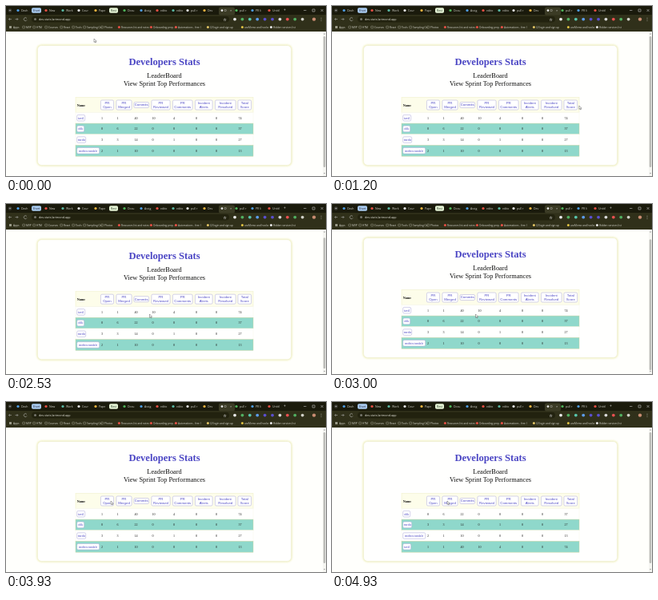
Recreate the animation shown at these times as an HTML page. Size 400 by 213 pixels, loop 5 s.

```html
<!DOCTYPE html>
<html lang="en">
<head>
<meta charset="utf-8">
<title>Developers Stats</title>
<style>
html, body { margin: 0; width: 100%; height: 100%; overflow: hidden; background: #fff; }
svg { display: block; width: 400px; height: 213px; }
text { white-space: pre; }
.serif { font-family: "Liberation Serif", "Times New Roman", serif; }
.sans { font-family: "Liberation Sans", Arial, sans-serif; }
.ui { font-family: "Open Sans", Inter, sans-serif; }
</style>
</head>
<body>
<svg viewBox="0 0 400 213">
  <defs><filter id="soft"><feGaussianBlur stdDeviation="1.2"/></filter></defs>
  <rect width="400" height="213" fill="#fffffc"/>
  <g id="page"></g>
  <rect x="396" y="31" width="4" height="182" fill="#f6f6f2"/>
  <path d="M396.9 35.5l1.1-1.6 1.1 1.6zM396.9 209l1.1 1.6 1.1-1.6z" fill="#999"/>
  <rect id="thumb" x="396.7" y="38" width="2.6" height="164" rx="1.3" fill="#bcbcb8"/>
  <g id="chrome"></g>
  <path id="cursor" d="M0 0V4.4L1.1 3.5 1.8 5 2.5 4.7 1.8 3.2H3.2Z" fill="#fff" stroke="#333" stroke-width=".4"/>
</svg>
<script>
const $ = id => document.getElementById(id);
const rect = (x, y, w, h, fill, more = '') =>
  `<rect x="${x}" y="${y}" width="${w}" height="${h}" fill="${fill}" ${more}/>`;
const text = (x, y, size, fill, str, kind = 'serif', more = '') =>
  `<text x="${x}" y="${y}" font-size="${size}" fill="${fill}" class="${kind}" ${more}>${str}</text>`;
const dot = (x, y, r, fill) => `<circle cx="${x}" cy="${y}" r="${r}" fill="${fill}"/>`;
const line = (d, color, width = .6) =>
  `<path d="${d}" fill="none" stroke="${color}" stroke-width="${width}"/>`;
const mid = 'text-anchor="middle"', bold = 'font-weight="700"';
const indigo = '#4b46c4', edge = 'stroke="#aaa7d8" stroke-width=".5"';

function button(x, y, w, h, lines, size, kind) {
  const first = y + h / 2 + size * .34 - (lines.length - 1) * 2.5;
  return rect(x, y, w, h, '#fff', `rx="1.6" ${edge}`) +
    lines.map((s, i) => text(x + w / 2, first + i * 5, size, indigo, s, kind, mid)).join('');
}

// Browser window
const tabs = [[19, 'Dash'], [54, 'New'], [75, 'Work'], [95, 'Cour'], [116, 'Pape'], [152, 'Docu'],
  [173, 'Assig'], [193, 'edito'], [213, 'edito'], [231, 'pull r'], [252, 'Dev'], [292, 'pull r'],
  [312, 'PR li'], [333, 'Untitl']];
const tabColors = ['#4f9fe8', '#e85045', '#5ab9a5', '#e8e8e8', '#f0b440', '#4fb45b'];
const folders = [[25, 'MVP'], [38, 'HTM'], [53, 'Courses'], [72, 'React'], [87, 'Tools'],
  [101, 'Sampling Co'], [123, 'Photos']];
const links = [[144, 'Resources list and notes', '#e85045'], [184, 'Onboarding prep - fr', '#e85045'],
  [215, 'Automations - free l', '#e85045'], [255, '(2) login and sign up', '#e2c565'],
  [298, 'useMemo and hooks', '#e2c545'], [334, 'Hidden services list', '#e8e8e8']];
const badges = ['#e8e8e8', '#51af61', '#58c5ad', '#5c9df0', '#5a4fd0', '#5a4fd0', '#d8d8d8', '#e95050', '#51af61', '#d0d0c8'];

function drawChrome() {
  let s = rect(0, 0, 400, 32, '#30301a') + rect(0, 0, 400, 11, '#1a1a0c');
  s += rect(266, 1.5, 20, 10, '#3b3b25', 'rx="2"') + dot(270, 5.6, 1.4, '#e6e6e6');
  s += text(273, 7, 3.6, '#eee', 'D', 'ui') + text(280, 7, 4, '#ddd', '×', 'ui');
  s += dot(5, 5.5, 2.2, '#41413a') + line('M4 5L5 6 6 5', '#ddd', .5);
  tabs.forEach(([x, name], i) => {
    s += dot(x - 4, 5.5, 1.6, tabColors[i % tabColors.length]) + text(x, 6.8, 3.5, '#d5d5cd', name, 'ui');
  });
  s += rect(32, 2.3, 12, 6.4, '#a9cbf0', 'rx="1.8"') + text(38, 6.8, 3.5, '#223', 'Short', 'ui', mid);
  s += rect(129, 2.3, 11, 6.4, '#e4f2d4', 'rx="1.8"') + text(134.5, 6.8, 3.5, '#232', 'Rest', 'ui', mid);
  s += text(347, 7.4, 5, '#ddd', '+', 'ui');
  s += line('M372 5.5h3.4M383 4h3v3h-3zM393.5 4l3 3m0-3l-3 3', '#ddd', .5);

  s += line('M7 16.5H3.5l1.5-1.5M3.5 16.5L5 18M11.5 16.5H15l-1.5-1.5M15 16.5L13.5 18', '#bbb', .5);
  s += line('M26 15.6a2 2 0 1 0 .1 1.8', '#ccc', .5);
  s += rect(32, 12.8, 247, 7.6, '#22220f', 'rx="3.8"') + dot(36.5, 16.6, 1.5, '#77776d');
  s += text(41, 18, 3.7, '#e8e8df', 'dev-stats.larimond.app', 'ui');
  s += text(271, 18.5, 5, '#ccc', '☆', 'ui');
  badges.forEach((c, i) => s += dot(286 + i * 9.4, 16.6, 1.9, c));
  s += dot(385, 16.6, 2.2, '#c98c72');
  [15, 16.6, 18.2].forEach(y => s += dot(394, y, .45, '#ddd'));

  s += rect(4, 25, 3, 3, '#999988') + text(9, 27.8, 3.2, '#d5d5cd', 'Apps', 'ui');
  folders.forEach(([x, name]) => {
    s += rect(x - 4.3, 25.2, 3, 2.6, 'none', 'rx=".5" stroke="#c8c8b8" stroke-width=".4"');
    s += text(x, 27.8, 3.2, '#d5d5cd', name, 'ui');
  });
  links.forEach(([x, name, color]) => {
    s += dot(x - 2.6, 26.6, 1.5, color) + text(x, 27.8, 3.1, '#d5d5cd', name, 'ui');
  });
  $('chrome').innerHTML = s;
}

// Leaderboard
const heads = [[118, 17, 'PR Open'], [137.5, 20, 'PR Merged'], [159.5, 19.5, 'Commits'],
  [181.5, 24, 'PR Reviewed'], [208, 25.5, 'PR Comments'], [236, 22.5, 'Incident Alerts'],
  [261, 26.5, 'Incident Resolved'], [289.5, 17.5, 'Total Score']];
const people = [
  { name: 'tavil', w: 10, stats: [1, 1, 40, 10, 4, 0, 0, 74] },
  { name: 'olik', w: 9, stats: [0, 6, 22, 0, 0, 0, 0, 37] },
  { name: 'medu', w: 11, stats: [3, 3, 14, 0, 1, 0, 0, 27] },
  { name: 'mohin.tandale', w: 28, stats: [2, 1, 10, 0, 0, 0, 0, 13] }
];
const byMerged = [1, 2, 3, 0].map(i => people[i]);

function drawPage(rows) {
  let s = rect(38.5, 48.5, 319, 152, '#eeeeb5', 'rx="6" filter="url(#soft)"');
  s += rect(39.5, 49.5, 317, 150, '#fffffe', 'rx="5" stroke="#eeeed4" stroke-width=".6"');
  s += text(198, 74, 12.6, indigo, 'Developers Stats', 'serif', `${mid} ${bold}`);
  s += text(198, 90.2, 8.3, '#111', 'LeaderBoard', 'serif', mid);
  s += text(198, 99.9, 8.3, '#111', 'View Sprint Top Performances', 'serif', mid);
  s += rect(87, 114.5, 222, 18.8, '#fdfdea', 'stroke="#eeeec4" stroke-width=".5"');
  s += text(88.7, 125.5, 4.2, '#111', 'Name', 'serif', bold);
  heads.forEach(([x, w, label]) => {
    const lines = label.split(' '), h = lines.length > 1 ? 12 : 7;
    s += button(x + .4, 124 - h / 2, w - .8, h, lines, 4.3, 'sans');
  });
  rows.forEach((p, i) => {
    const y = 133.4 + i * 13.7;
    s += rect(87, y, 222, 13.7, i % 2 ? '#8fd8cb' : '#fffffe',
      `stroke="${i % 2 ? '#c6d5a3' : '#f6f6ea'}" stroke-width=".5"`);
    s += button(88.7, y + 3, p.w, 7.6, [p.name], 4.1, 'serif');
    p.stats.forEach((n, c) => s += text(heads[c][0] + 1, y + 8.2, 4.1, '#222', n));
  });
  $('page').innerHTML = s;
}

// Keys are [time, ...values]
const pointer = [[0, 110, 41], [300, 122, 52], [1050, 308, 125], [1250, 309, 125], [1600, 292, 129],
  [2000, 252, 139], [2400, 179.5, 138], [3150, 179.5, 138], [3800, 131, 124], [4300, 131, 124], [4480, 144, 124]];
const scroll = [[2380, 0], [2530, 4.8], [2730, 4.8], [2800, 7], [3350, 7], [3500, 0]];

function at(keys, t) {
  const i = keys.findIndex(k => k[0] > t);
  if (i < 0) return keys[keys.length - 1].slice(1);
  if (i === 0) return keys[0].slice(1);
  const a = keys[i - 1], b = keys[i];
  const u = (t - a[0]) / (b[0] - a[0]), e = u * u * (3 - 2 * u);
  return a.slice(1).map((v, k) => v + (b[k + 1] - v) * e);
}

let shown;
function frame() {
  const t = performance.now() % 5000;
  const rows = t < 4540 ? people : byMerged;
  if (rows !== shown) drawPage(shown = rows);
  const [y] = at(scroll, t);
  $('page').setAttribute('transform', `translate(0 ${-y})`);
  $('thumb').setAttribute('y', 38 + y * .9);
  $('cursor').setAttribute('transform', `translate(${at(pointer, t)})`);
  requestAnimationFrame(frame);
}

drawChrome();
frame();
</script>
</body>
</html>
```
